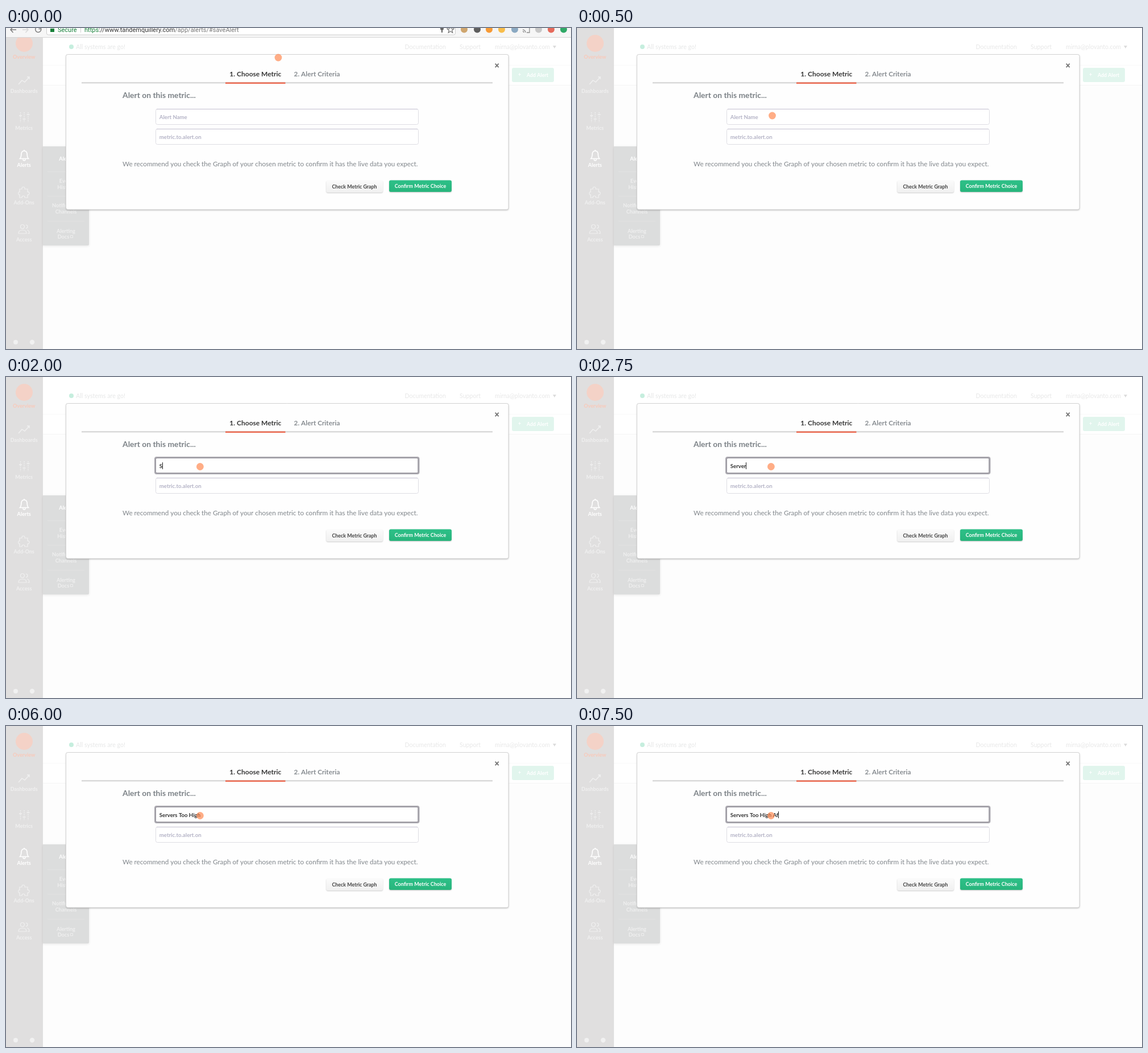
Write an HTML page with a canvas that moves like this. It is 994 px wide and 564 px high and loops after 8 s.

```html
<!DOCTYPE html>
<html lang="en">
<head>
<meta charset="utf-8">
<title>Choose metric</title>
<style>
  html, body { margin: 0; width: 100%; height: 100%; overflow: hidden; background: #fff; }
  canvas { display: block; width: 994px; height: 564px; }
</style>
</head>
<body>
<canvas id="stage" width="994" height="564"></canvas>
<script>
const ctx = document.getElementById('stage').getContext('2d');
const LOOP = 8000;
const TAU = Math.PI * 2;
const TITLE = 'Servers Too High Af';

// [start ms, typed characters, caret visible]
const typing = [
  [0, 0, 0], [1000, 0, 1], [1500, 0, 0], [2000, 1, 1], [2250, 3, 1], [2500, 4, 1],
  [2750, 6, 1], [3000, 7, 1], [3250, 8, 1], [3750, 9, 1], [4000, 11, 1], [4500, 12, 1],
  [5000, 14, 1], [5250, 16, 1], [5500, 17, 1], [6000, 17, 0], [6500, 17, 1],
  [7000, 17, 0], [7250, 18, 1], [7500, 19, 1]
];

// [start ms, x, y, dot visible, ring opacity]
const pointer = [
  [0, 479, 52, 1, 0], [250, 361.5, 140.5, 1, 0], [500, 343.5, 154, 1, 0],
  [750, 338.3, 173.5, 1, 0.4], [1000, 338.3, 173.5, 0, 0.4],
  [1250, 338.3, 173.8, 1, 0], [1500, 341.4, 157.5, 1, 0]
];

const stateAt = (steps, t) => steps.filter(s => s[0] <= t).pop();

function rect(x, y, w, h, fill) {
  ctx.fillStyle = fill;
  ctx.fillRect(x, y, w, h);
}

function circle(x, y, r, fill) {
  ctx.beginPath();
  ctx.arc(x, y, r, 0, TAU);
  ctx.fillStyle = fill;
  ctx.fill();
}

function box(x, y, w, h, r, fill, stroke, width = 1) {
  ctx.beginPath();
  ctx.roundRect(x, y, w, h, r);
  if (fill) { ctx.fillStyle = fill; ctx.fill(); }
  if (stroke) { ctx.strokeStyle = stroke; ctx.lineWidth = width; ctx.stroke(); }
}

function shadowBox(x, y, w, h, r, fill, shadow, blur, dy) {
  ctx.save();
  ctx.shadowColor = shadow;
  ctx.shadowBlur = blur;
  ctx.shadowOffsetY = dy;
  box(x, y, w, h, r, fill);
  ctx.restore();
}

function line(path, color, width = 1) {
  ctx.strokeStyle = color;
  ctx.lineWidth = width;
  ctx.stroke(new Path2D(path));
}

function label(str, x, y, size, color, weight = 700, align = 'left', family = 'Lato') {
  ctx.font = `${weight} ${size}px ${family}, sans-serif`;
  ctx.textAlign = align;
  ctx.fillStyle = color;
  ctx.fillText(str, x, y);
}

function vertical(y0, y1, top, bottom) {
  const g = ctx.createLinearGradient(0, y0, 0, y1);
  g.addColorStop(0, top);
  g.addColorStop(1, bottom);
  return g;
}

function drawHeader() {
  rect(65, 0, 929, 100, '#fff');
  rect(65, 65, 929, 1, '#f9f9f9');
  rect(65, 100, 929, 1, '#f5f5f5');
  circle(115, 33, 4, '#c6eede');
  label('All systems are go!', 123, 37, 10.7, '#e6e7e7', 400);
  label('Documentation', 701.5, 37, 10.6, '#e8e8e8', 400);
  label('Support', 798, 37, 10.6, '#e8e8e8', 400);
  label('mirna@plovanto.com', 860, 37, 10.5, '#e8e8e8', 400);
  ctx.fillStyle = '#dcdcdc';
  ctx.fill(new Path2D('M962 31h6l-3 5z'));
  box(890, 70, 74, 25, 3, '#e1f5ed');
  label('+', 901, 85, 9, '#fff');
  label('Add Alert', 916, 86, 8.9, '#fff');
}

function drawSidebar() {
  const faint = '#f0f0f0';
  rect(0, 0, 65, 564, '#e0dfdf');
  circle(32, 27, 15, '#f4d2c7');

  [['Overview', 54, '#f8c9ba'], ['Dashboards', 114, faint], ['Metrics', 179, faint],
   ['Alerts', 244, '#fff'], ['Add-Ons', 310, faint], ['Access', 375, faint]]
    .forEach(([name, y, color]) => label(name, 31.7, y, 9.1, color, 700, 'center'));

  line('M22 99l6-7 5 3 8-9M37 86h4v4', faint, 1.4);
  ctx.setLineDash([2, 1.5]);
  line('M25.5 148v18M32 148v18M39 148v18', faint, 1.3);
  ctx.setLineDash([]);
  line('M23 154h5M29.5 160h5M36.5 152h5', faint, 1.4);
  line('M24.5 229.5c3-3 2-6 2.5-9 .5-3 2.500-4.500 5-4.500s4.500 1.500 5 4.500c.5 3-.5 6 2.500 9zM30 230.500a2 2.500 0 0 0 4 0M32 214v2', '#fff', 1.6);
  line('M24 283h4c-1-5 6-5 5 0h5v5c4-1 4 6 0 5v5h-5c1-4-6-4-5 0h-4v-5c-3 1-3-6 0-5z', faint, 1.2);
  line('M22 361c0-5 3-6 7-6s7 1 7 6zM32.500 349a3.500 3.500 0 1 1-7 0a3.500 3.500 0 1 1 7 0M35 346a3 3 0 1 1 0 6M37 355c3 0 4 2 4 6h-3', faint, 1.2);

  circle(17, 552, 4, '#f1f1f1');
  circle(46, 552, 4.2, '#f1f1f1');
}

function drawSubmenu() {
  shadowBox(65, 208, 81, 174, [0, 2, 2, 0], '#dcdddd', 'rgba(0,0,0,.1)', 4, 1);
  [252, 295, 339].forEach(y => rect(73, y, 65, 1, '#e2e2e2'));
  [['Alerts', 233, '#fff'], ['Event', 272], ['History', 283], ['Notification', 315],
   ['Channels', 326], ['Alerting', 360], ['Docs', 370]]
    .forEach(([name, y, color = '#efefef']) =>
      label(name, name === 'Docs' ? 101 : 105.5, y, 9.2, color, 700, 'center'));
  box(113.5, 364.5, 4, 4, 0, null, '#ededed');
}

function drawBrowserBar() {
  const gray = '#7b7b7b';
  rect(0, 0, 994, 16, '#f6f6f6');
  rect(0, 16, 994, 1, '#d5d5d5');
  box(71.5, -10, 719, 22, 3, '#fff', '#cecece');
  line('M18 3H8M12.500-2L8 3l4.500 5', gray, 1.5);
  line('M29 3h10M34.500-2L39 3l-4.500 5', '#d8d8d8', 1.5);
  line('M61.500 1a5 5 0 1 1-2.500-3M61.500-3v4.500h-4', gray, 1.5);
  rect(78, 1, 7, 6, '#168039');
  label('Secure', 91, 7, 11, '#168039', 400, 'left', 'Roboto');
  rect(131, 0, 1, 8, '#d0d0d0');

  let x = 138;
  [['https', '#168039'], ['://www.tandemquillery.com', '#333'], ['/app/alerts/#saveAlert', '#777']]
    .forEach(([part, color]) => {
      label(part, x, 7, 11, color, 400, 'left', 'Roboto');
      x += ctx.measureText(part).width;
    });

  circle(767, 1, 3, '#666');
  rect(766, 2, 2, 6, '#666');
  line('M782-3l1.600 4 4.400.3-3.400 2.700 1.200 4.200-3.800-2.400-3.800 2.400 1.200-4.200L776 1.300l4.400-.3z', '#666', 1.1);

  [[806, '#cfa66f'], [829, '#5e5e5e'], [850, '#f79a35'], [872, '#f8bd4a'], [895, '#8ba9c2'],
   [937, '#c7c7c7'], [959, '#e66a5c'], [981, '#2fa866']]
    .forEach(([cx, color]) => circle(cx, 2.5, 6, color));
  line('M909 0v-2h12v10h-5M909 3a5 5 0 0 1 5 5M909 6a2 2 0 0 1 2 2', '#8c8c8c', 1.3);
}

function drawField(y, focused) {
  if (focused) {
    box(262.5, y - 0.5, 463.5, 28, 2.5, '#fff', '#aaa8af', 3);
    box(263.5, y + 0.5, 461.5, 26, 2, null, '#96939c');
    return;
  }
  box(263.5, y + 0.5, 462, 27, 3, '#fff', '#dedde3');
  rect(265, y, 459, 1, '#c3c0d0');
}

function drawModal(t) {
  shadowBox(106, 47, 778, 272, 3, '#fefefe', 'rgba(0,0,0,.32)', 3, 1);
  box(105.5, 46.5, 778.5, 272.5, 3, null, '#d4d4d4');
  line('M860.700 62.700l6 6.500M866.700 62.700l-6 6.500', '#777', 1.9);

  label('1. Choose Metric', 393.3, 85, 12, '#363636');
  label('2. Alert Criteria', 506.6, 85, 11.8, '#868b90');
  rect(133, 95, 723, 2.5, '#d9d9d9');
  rect(386, 95.5, 105.5, 2.5, '#ec6b52');

  label('Alert on this metric...', 205, 123, 13.9, '#7c8287');
  const focused = t >= 1000;
  drawField(142, focused);
  drawField(177, false);

  const [, count, caret] = stateAt(typing, t);
  const typed = TITLE.slice(0, count);
  if (count) label(typed, 269.8, 160, 9.6, '#333');
  else label('Alert Name', 269.8, 160, 9.6, '#b4b3c6');
  if (caret) {
    const width = count ? ctx.measureText(typed).width : 0;
    rect(Math.round(269.8 + width), 150, 1, 12, '#222');
  }
  label('metric.to.alert.on', 269.8, 195, 9.65, '#b4b3c6');

  label('We recommend you check the Graph of your chosen metric to confirm it has the live data you expect.',
    205, 243, 11.7, '#80868b', 400);

  shadowBox(563.5, 268, 99.5, 21, 3, vertical(268, 289, '#fbfbfb', '#f0f0f0'), 'rgba(0,0,0,.2)', 2, 1);
  label('Check Metric Graph', 613, 282, 8.9, '#444', 700, 'center');
  shadowBox(674, 267.5, 110, 20.5, 3, vertical(267, 288, '#2dc088', '#28b57c'), 'rgba(0,0,0,.22)', 2, 1);
  label('Confirm Metric Choice', 729, 281, 9, '#fff', 700, 'center');
}

function drawPointer(t) {
  const [, x, y, dot, ring] = stateAt(pointer, t);
  if (dot) circle(x, y, 6.4, 'rgba(255,130,72,.66)');
  if (ring) {
    ctx.beginPath();
    ctx.arc(x, y, 7.3, 0, TAU);
    ctx.strokeStyle = `rgba(240,130,95,${ring})`;
    ctx.lineWidth = 1;
    ctx.stroke();
  }
}

function draw(t) {
  rect(0, 0, 994, 564, '#fdfdfd');
  drawHeader();
  drawSidebar();
  drawSubmenu();
  if (t < 500) drawBrowserBar();
  drawModal(t);
  drawPointer(t);
}

const start = performance.now();
function tick() {
  draw((performance.now() - start) % LOOP);
  requestAnimationFrame(tick);
}
tick();
</script>
</body>
</html>
```
